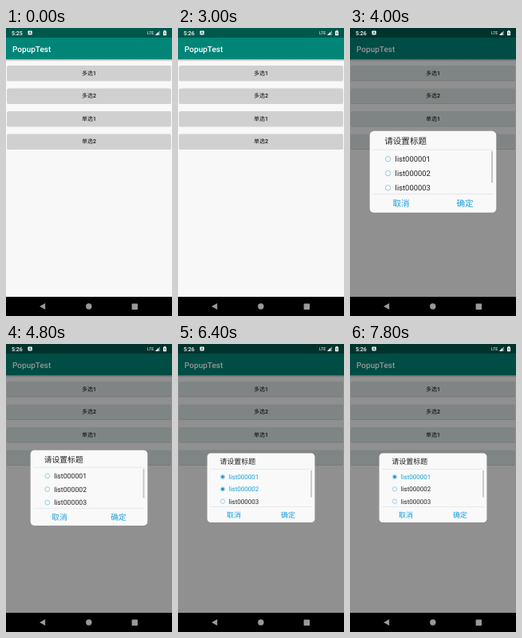
Animation of 208 by 360 pixels, one loop 8 s. Source, as an HTML page:

```html
<!DOCTYPE html>
<html lang="zh-CN">
<head>
<meta charset="utf-8">
<title>PopupTest</title>
<style>
  html, body { margin: 0; width: 100%; height: 100%; overflow: hidden; background: #000; }
  svg { display: block; width: 100vw; height: 100vh; }
  text { font-family: Roboto, "Noto Sans CJK SC", "Noto Sans CJK", sans-serif; text-rendering: geometricPrecision; }
  .middle { text-anchor: middle; }
  .medium { font-weight: 500; }
  .action { font-size: 9px; fill: #1b9fdc; }
</style>
</head>
<body>
<svg viewBox="0 0 208 360">
  <defs>
    <linearGradient id="fade" x2="0" y2="1">
      <stop stop-color="#000" stop-opacity=".24"/>
      <stop offset="1" stop-color="#000" stop-opacity="0"/>
    </linearGradient>
  </defs>

  <rect width="208" height="360" fill="#f8f8f8"/>
  <rect width="208" height="12" fill="#00574b"/>
  <rect y="12" width="208" height="27.2" fill="#008577"/>
  <rect y="39.2" width="208" height="2.8" fill="url(#fade)"/>
  <text x="8" y="29.6" font-size="10" class="medium" fill="#fff">PopupTest</text>
  <g id="buttons"></g>
  <rect id="dim" width="208" height="336" fill="#000"/>

  <g fill="#fff">
    <text id="clock" x="7" y="8.6" font-size="7" class="medium"></text>
    <rect x="27.5" y="3.4" width="5.2" height="5.2" rx=".8"/>
    <path d="M28.9 7.6 30.1 4.5 31.3 7.6M29.3 6.6h1.6" fill="none" stroke="#00463d" stroke-width=".6"/>
    <text x="177" y="8" font-size="5.3">LTE</text>
    <path d="M187 9 193 3V9Z" opacity=".4"/>
    <path d="M187 9 191 5V9Z"/>
    <path d="M197 3.7h1v-.8h2v.8h1V9.2h-4Z"/>
    <path d="M199.3 4.6 198 6.6h.9V8.3l1.2-2.1h-.8Z" fill="#00463d"/>
  </g>

  <rect y="336" width="208" height="24"/>
  <g fill="#999">
    <path d="M42 348 49.2 344V352Z"/>
    <circle cx="103.8" cy="348" r="3.7"/>
    <rect x="157.6" y="344.5" width="7.4" height="7.4" rx=".4"/>
  </g>

  <g id="dialog">
    <rect x="36.6" y="136.5" width="134.8" height="86.6" rx="4.5" fill="#f9f9f9"/>
    <text x="52.3" y="150.3" font-size="9" fill="#222">请设置标题</text>
    <path d="M40 156.4H168M40 203.5H168" stroke="#dde6e8" stroke-width=".7"/>
    <path id="accent" d="M71 156.4H165" stroke="#8fe3e3" stroke-width=".8"/>
    <rect x="166.1" y="158" width="1.7" height="33.5" fill="#c2c6c6"/>
    <g id="rows"></g>
    <text x="70" y="216.8" class="middle action">取消</text>
    <text x="138" y="216.8" class="middle action">确定</text>
  </g>
</svg>
<script>
const LOOP = 8000, STEP = 200;
const $ = id => document.getElementById(id);

$("buttons").innerHTML = ["多选1", "多选2", "单选1", "单选2"].map((label, i) => {
  const y = 47 + i * 28.5;
  return `<rect x="1.2" y="${y + .6}" width="205.6" height="18.8" rx="1.5" opacity=".16"/>
    <rect class="face" x="1.5" y="${y}" width="205" height="18.6" rx="1.5"/>
    ${i ? "" : `<rect id="ripple" x="12.4" y="${y}" width="192" height="18.6" fill="#cecece"/>`}
    <text x="104" y="${y + 11.9}" font-size="7" class="middle medium" fill="#111">${label}</text>`;
}).join("");

$("rows").innerHTML = [1, 2, 3].map((n, i) => {
  const y = 166.1 + i * 15.3;
  return `<g class="row">
    <circle cx="56" cy="${y}" r="2.7" fill="none" stroke="#7dbfdd" stroke-width=".7"/>
    <circle class="dot" cx="56" cy="${y}" r="1.8" fill="#1b86c4"/>
    <text x="63.7" y="${y + 2.8}" font-size="8">list00000${n}</text>
  </g>`;
}).join("");

const faces = document.querySelectorAll(".face");
const rows = document.querySelectorAll(".row");

// Start and end of each row's checked state
const checked = [[5200, LOOP], [5800, 7000], [LOOP, LOOP]];
// Dialog scale over time: pops in, overshoots, settles
const scaleKeys = [[3200, .4], [3800, 1.176], [4600, 1.176], [5000, 1], [LOOP, 1]];

function valueAt(keys, t) {
  const i = Math.max(1, keys.findIndex(key => t <= key[0]));
  const [t0, a] = keys[i - 1], [t1, b] = keys[i];
  return a + (b - a) * (t - t0) / (t1 - t0);
}

function show(element, visible) {
  element.setAttribute("visibility", visible ? "inherit" : "hidden");
}

function render(t) {
  const dimmed = t >= 3200, open = t >= 3400;
  $("clock").textContent = t < 1400 ? "5:25" : "5:26";
  $("dim").setAttribute("opacity", dimmed ? .42 : 0);
  show($("ripple"), t === 3200);
  faces.forEach(face => face.setAttribute("fill", dimmed ? "#dbe5e5" : "#d0d0d0"));

  show($("dialog"), open);
  if (!open) return;
  const scale = valueAt(scaleKeys, t);
  $("dialog").setAttribute("transform", `translate(104 180) scale(${scale}) translate(-104 -180)`);
  show($("accent"), t >= 5200 && t < 5800);
  rows.forEach((row, i) => {
    const on = t >= checked[i][0] && t < checked[i][1];
    show(row.querySelector(".dot"), on);
    row.lastElementChild.setAttribute("fill", on ? "#1b9fdc" : "#222");
  });
}

const start = performance.now();
function tick() {
  const t = (performance.now() - start) % LOOP;
  render(Math.floor(t / STEP) * STEP);
  requestAnimationFrame(tick);
}
tick();
</script>
</body>
</html>
```
